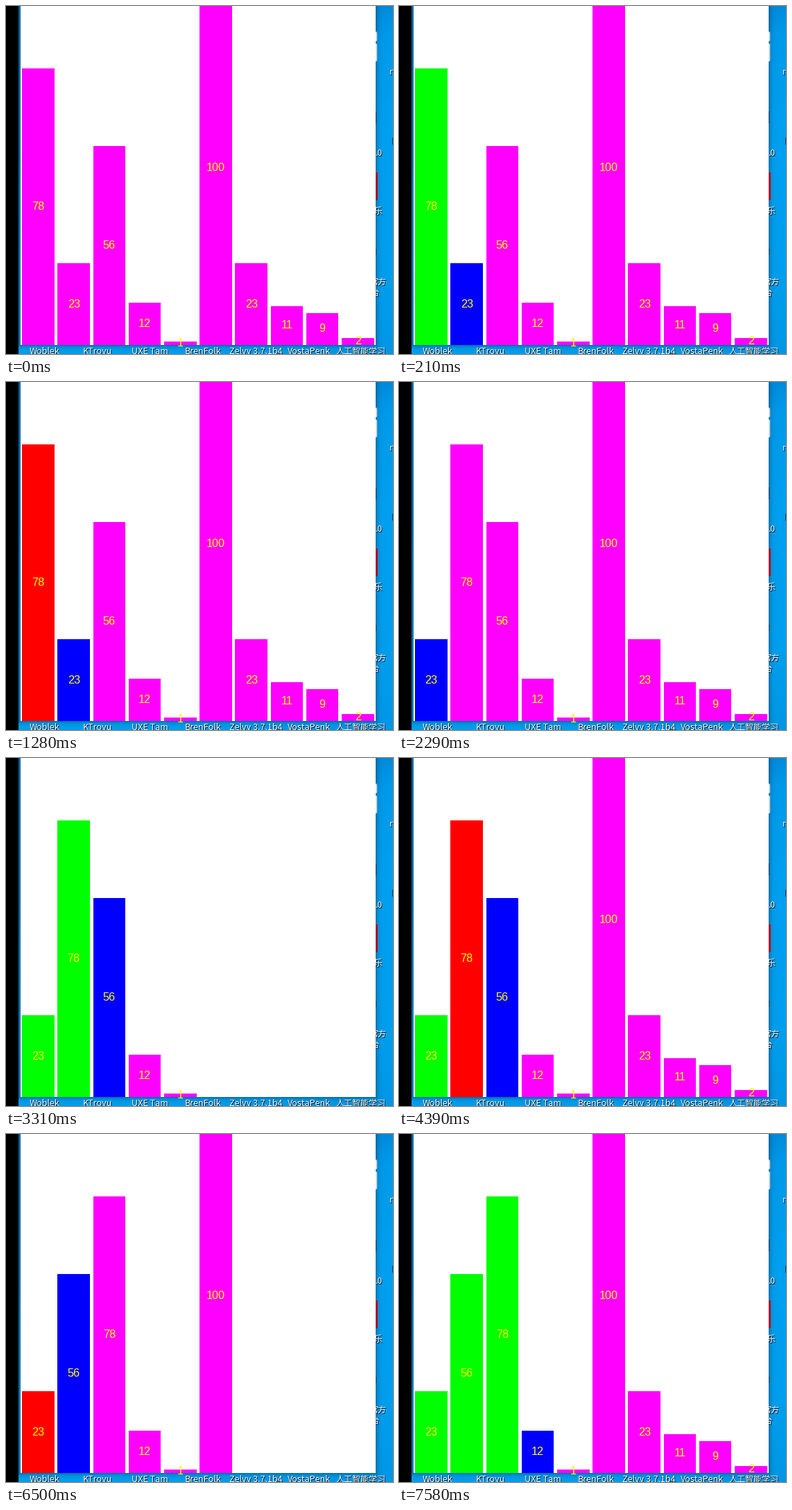
These frames come from a looping animation (558 px wide and 502 px high, 8000 ms). A matplotlib script:

```python
import numpy as np
import matplotlib.pyplot as plt
from matplotlib.animation import FuncAnimation
from matplotlib.patches import FancyBboxPatch, Rectangle

W, H, DPI = 558, 502, 64
LOOP, STEP = 8000, 20
LEFT, RIGHT, FLOOR = 21, 533, 489      # edges of the white window
PITCH, BAR_W, UNIT = 51.2, 46.6, 5.12

COLORS = {"m": "#ff00ff", "r": "#ff0000", "g": "#00ff00", "b": "#0000ff"}
TAIL = [12, 1, 100, 23, 11, 9, 2]
ALL = 10

# start in ms, first three values, colours of the first four bars, bars drawn
STATES = [
    (0, (78, 23, 56), "mmmm", ALL),
    (210, (78, 23, 56), "gbmm", ALL),
    (1220, (78, 23, 56), "rbmm", 5),
    (1280, (78, 23, 56), "rbmm", ALL),
    (2290, (23, 78, 56), "bmmm", ALL),
    (3310, (23, 78, 56), "ggbm", 5),
    (3390, (23, 78, 56), "ggbm", ALL),
    (4390, (23, 78, 56), "grbm", ALL),
    (5400, (23, 56, 78), "gbmm", 5),
    (5480, (23, 56, 78), "gbmm", ALL),
    (6500, (23, 56, 78), "rbmm", 6),
    (6560, (23, 56, 78), "rbmm", ALL),
    (7580, (23, 56, 78), "gggb", ALL),
]

fig = plt.figure(figsize=(W / DPI, H / DPI), dpi=DPI)
ax = fig.add_axes([0, 0, 1, 1])


def pt(px):
    return px * 72 / DPI


def rect(x0, y0, x1, y1, color, z, **kw):
    return ax.add_patch(Rectangle((x0, y0), x1 - x0, y1 - y0,
                                  fc=color, lw=0, zorder=z, **kw))


def label(x, y, text, size, ha="center", z=3):
    """White desktop caption with a dark drop shadow."""
    for dx, dy, color, alpha in ((1, 1, "black", 0.8), (0, 1, "black", 0.5),
                                 (0, 0, "white", 1)):
        ax.text(x + dx, y + dy, text, color=color, alpha=alpha, ha=ha,
                va="baseline", fontsize=pt(size), zorder=z,
                family="Noto Sans CJK JP")


def wallpaper():
    y, x = np.mgrid[0:H, 0:W]
    stops = [0, 14, 40, 180, 400, H]
    img = np.zeros((H, W, 3))
    img[..., 1] = np.interp(y + (x - W) * 0.4, stops, [140, 146, 154, 160, 158, 150])
    img[..., 2] = np.interp(y + (x - W) * 0.4, stops, [220, 226, 234, 240, 238, 230])
    # window shadow, then the dark strip on the left
    gap = np.hypot(np.clip(x - RIGHT, 0, None), np.clip(y - FLOOR, 0, None))
    img *= (1 - 0.28 * np.exp(-gap / 3))[..., None]
    img[:, :18] = 0
    return img / 255


def desktop():
    ax.imshow(wallpaper(), extent=(0, W, H, 0), interpolation="nearest",
              aspect="auto", zorder=0)
    # icons peeking out behind the window
    for top, bottom in ((37, 51), (54, 80)):
        ax.add_patch(FancyBboxPatch((510, top), 25, bottom - top, fc="#d9e6ee",
                                    ec="#8fb4c8", lw=pt(0.8), zorder=1,
                                    boxstyle="round,pad=0,rounding_size=2"))
    rect(520, 152, 534, 169, "#123a55", 1)
    rect(496, 240, 536, 280, "#a80f2c", 1)
    rect(520, 350, 534, 359, "#1d4a66", 1)
    rect(557, 190, 558, 200, "#0b3550", 1)
    label(553, 99, "n", 12, "left", 1)
    label(542, 216, ".0", 12, "right", 1)
    label(537, 300, "乐", 12, z=1)
    label(536, 402, "官方", 12, z=1)
    label(531, 418, "台", 12, z=1)
    label(556.5, 216, "(", 12, "left", 1)
    # captions below the window
    names = ["Woblek", "KTrovu", "UXE Tam", "BrenFolk", "Zelvy 3.7.1b4", "VostaPenk"]
    for i, name in enumerate(names):
        label(55.5 + 76.2 * i, 502, name, 12.6)
    label(512, 502, "人工智能学习", 12)


desktop()
window = rect(LEFT, -1, RIGHT, FLOOR, "white", 2)
ax.set_xlim(0, W)
ax.set_ylim(H, 0)
ax.axis("off")

bars, nums = [], []
for i in range(ALL):
    x = 23.2 + PITCH * i
    bars.append(rect(x, FLOOR, x + BAR_W, FLOOR, COLORS["m"], 4))
    num = ax.text(x + BAR_W / 2, FLOOR, "", color="#ffff00", ha="center",
                  va="baseline", fontsize=pt(16.3), family="Liberation Sans",
                  zorder=5)
    num.set_clip_path(window)
    nums.append(num)


def draw(frame):
    now = frame * STEP + STEP / 2
    _, head, paint, shown = [s for s in STATES if s[0] <= now][-1]
    values = list(head) + TAIL
    for i, (bar, num, value) in enumerate(zip(bars, nums, values)):
        height = value * UNIT
        bar.set_y(FLOOR - height)
        bar.set_height(height)
        bar.set_facecolor(COLORS[paint[i] if i < len(paint) else "m"])
        num.set_text(str(value))
        num.set_y(FLOOR - height / 2 + 4.5)
        bar.set_visible(i < shown)
        num.set_visible(i < shown)
    return bars + nums


anim = FuncAnimation(fig, draw, frames=LOOP // STEP, interval=STEP,
                     init_func=lambda: draw(0), repeat=True, repeat_delay=0)
plt.show()
```
